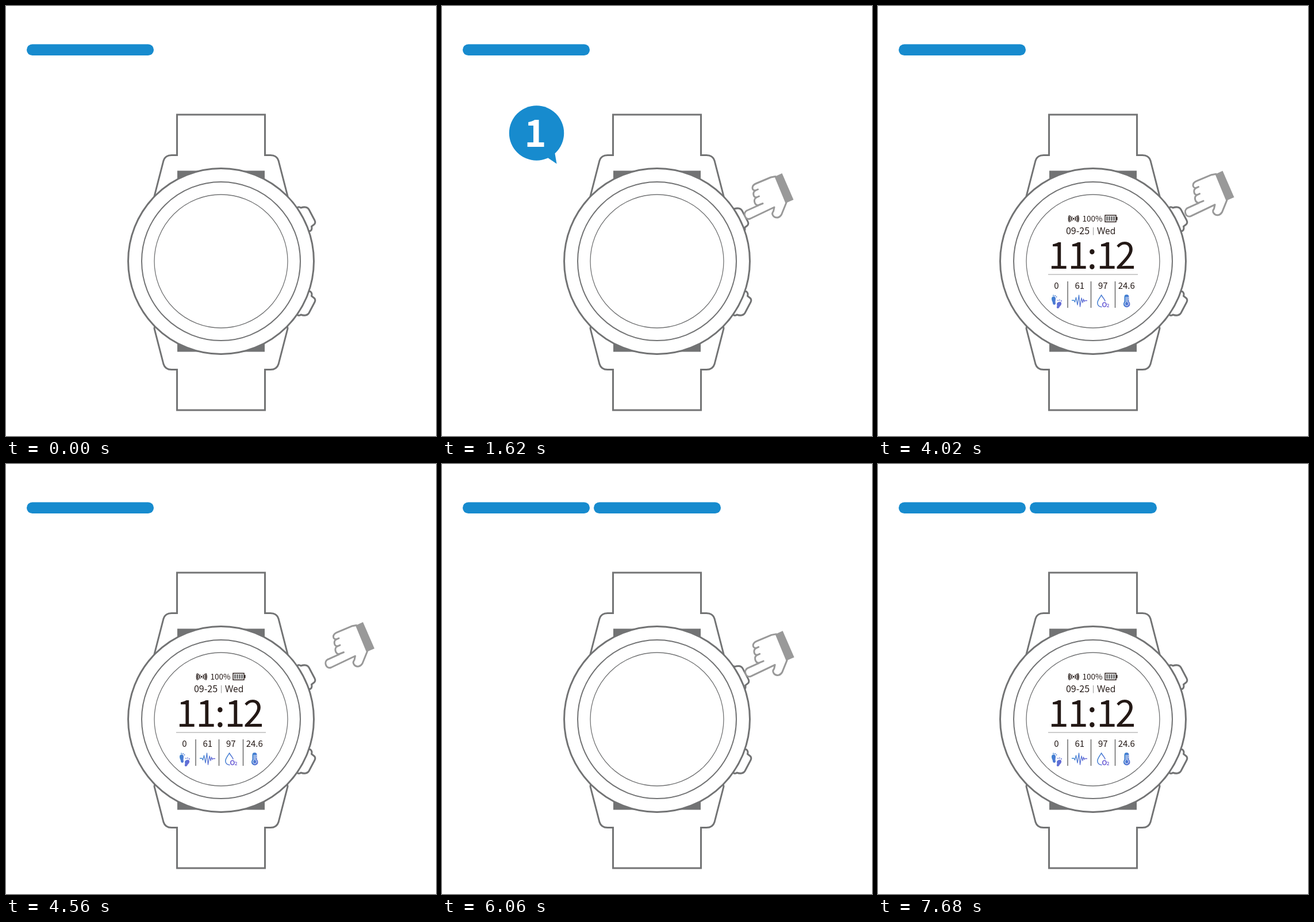
Animation, 748 px wide and 748 px high, one loop 8 s. Source, as an HTML page:

```html
<!DOCTYPE html>
<html lang="en">
<head>
<meta charset="utf-8">
<title>Smartwatch power button</title>
<style>
  html, body { margin: 0; width: 100%; height: 100%; overflow: hidden; background: #fff; }
  svg { display: block; width: 100%; height: 100%; }
  text { font-family: 'Noto Sans CJK SC', 'Noto Sans CJK JP', 'Noto Sans', sans-serif; text-anchor: middle; }
  .line { fill: #fff; stroke: #727374; stroke-width: 3; stroke-linejoin: round; }
  .ink { fill: #231815; }
  .thin { fill: none; stroke: #231815; }
</style>
</head>
<body>
<svg viewBox="0 0 748 748" xmlns="http://www.w3.org/2000/svg">
  <defs>
    <linearGradient id="tint" gradientUnits="userSpaceOnUse" x1="0" y1="0" x2="28" y2="10" spreadMethod="pad">
      <stop offset="0" stop-color="#3486d0"/>
      <stop offset="1" stop-color="#7b62d9"/>
    </linearGradient>
    <path id="key" d="M503 355 Q508 347 513 351 Q517 349.500 521 350 Q525 350.500 527 354 L537 373 Q539 377.500 536 380 L531.500 383.500 Q533 388 530 391 L524 393"/>
    <path id="lug" d="M297.500 259.500 H288 Q277 259.500 274 269 L258 331 L270 400 H374"/>
  </defs>

  <g fill="#178bce">
    <rect x="36" y="66.500" width="221" height="19.500" rx="9.750"/>
    <rect id="bar" x="264" y="66.500" width="221" height="19.500" rx="9.750"/>
  </g>

  <g class="line">
    <use href="#lug"/>
    <use href="#lug" transform="translate(748) scale(-1 1)"/>
    <use href="#lug" transform="translate(0 892) scale(1 -1)"/>
    <use href="#lug" transform="translate(748 892) scale(-1 -1)"/>
    <path d="M297.500 261 V189 H450.500 V261 M297.500 631 V703 H450.500 V631" stroke-linejoin="miter"/>
    <rect x="298" y="286.500" width="152" height="315" fill="#727374" stroke="none"/>
    <g id="press"><use href="#key"/></g>
    <use href="#key" transform="translate(0 888) scale(1 -1)"/>
    <circle cx="374" cy="444" r="161.500"/>
    <circle cx="374" cy="444" r="138" stroke-width="2"/>
    <circle cx="374" cy="444" r="116" stroke-width="1.300"/>
  </g>

  <g id="screen">
    <g class="thin" stroke-width="1.500" stroke-linecap="round">
      <circle cx="340.300" cy="370" r="1.600" class="ink" stroke="none"/>
      <path d="M337.500 367 q-2 3 0 6 M335 365.500 q-3 4.500 0 9 M332.800 364.500 q-2.800 5.500 0 11"/>
      <path d="M343.100 367 q2 3 0 6 M345.600 365.500 q3 4.500 0 9 M347.800 364.500 q2.800 5.500 0 11"/>
    </g>
    <rect class="thin" x="395" y="364" width="19" height="11.500" stroke-width="1.400"/>
    <path d="M398.500 366 V373.500 M402.500 366 V373.500 M406.500 366 V373.500 M410.500 366 V373.500" stroke="#777" stroke-width="3"/>
    <rect class="ink" x="414.500" y="367" width="2" height="5.500"/>
    <g class="ink">
      <text x="373" y="375.300" font-size="13.500">100%</text>
      <text x="347.500" y="397.300" font-size="16">09-25</text>
      <text x="397.200" y="397.300" font-size="15.500" style="font-family:'Open Sans','Noto Sans',sans-serif">Wed</text>
      <g id="clock" font-size="64"></g>
      <g font-size="15">
        <text x="310.300" y="491.500">0</text>
        <text x="350.800" y="491.500">61</text>
        <text x="391.300" y="491.500">97</text>
        <text x="432.300" y="491.500">24.6</text>
      </g>
    </g>
    <path d="M374.500 385 V398.500 M296 467 H452" stroke="#999" stroke-width="1"/>
    <path d="M330 479 V525 M370.500 479 V525 M412.500 479 V525" stroke="#555" stroke-width="1.300"/>

    <g transform="translate(301 502)" fill="url(#tint)">
      <path d="M1 7 C1 2 8 2 8 7 C8 10 7 12 8 15 C8 19 3 18 3 15 C3 12 1 11 1 7 Z"/>
      <path d="M10 16 C11 12 19 11 18 16 C18 19 15 20 14 23 C12 25 9 24 10 21 C11 19 10 18 10 16 Z"/>
      <circle cx="4" cy="1.500" r="1"/><circle cx="7" cy="2" r="1"/><circle cx="9.500" cy="4" r=".9"/>
      <circle cx="12" cy="10" r=".9"/><circle cx="15" cy="9.500" r="1"/><circle cx="18" cy="11" r="1"/>
    </g>
    <path transform="translate(337 513)" fill="none" stroke="url(#tint)" stroke-width="1.300" stroke-linejoin="round"
      d="M0 -1 H4 L5.500 2 L7.500 -6 L10 7 L12.500 -10 L14.500 10 L17 -5 L19 3 L20.500 -3 L22 1 L23 -.5 H27"/>
    <g transform="translate(381 502)">
      <path fill="none" stroke="url(#tint)" stroke-width="1.500" stroke-linecap="round"
        d="M8 21.500 C3 21.500 .8 18 .8 14.500 C.8 10 5 5.500 7.500 1 C10 5 13 8 14 11"/>
      <g fill="#7467d8" font-weight="bold">
        <text x="12.800" y="21.500" font-size="12">O</text>
        <text x="19" y="22" font-size="8">2</text>
      </g>
    </g>
    <g transform="translate(426.500 502)">
      <path fill="url(#tint)" d="M2 4 Q2 0 6 0 Q10 0 10 4 V12 Q12 14 12 16.500 A5.800 5.800 0 0 1 .4 16.500 Q.4 14 2 12 Z"/>
      <path fill="none" stroke="#fff" stroke-width="1" d="M5 4 V13 A3.300 3.300 0 1 0 7.500 13 V4 M8.500 5 h1.500 M8.500 8 h1.500"/>
    </g>
  </g>

  <g id="bubble">
    <path fill="#178bce" d="M184 264 L199.500 274.500 L196 254 Z"/>
    <circle cx="164.500" cy="221" r="47.700" fill="#178bce"/>
    <text id="count" x="162.500" y="245" font-size="65" font-weight="bold" fill="#fff"></text>
  </g>

  <g id="hand" fill="#fff" stroke="#999" stroke-width="3" stroke-linejoin="round" stroke-linecap="round">
    <path d="M580 296.500 L572 298 L547 308.500 C537 312.500 539 321 545 321 C540 324 541 333 547 333 C541 336 543 346 550 347 L530 356 C523 360 527 373 536 370 L578 350 L576.500 357 C572 362 577 369 584 368 Q588 367 590.500 363 L599 342"/>
    <path fill="none" d="M545 321 l4.500 -2 M547 333 l4.500 -2 M549 347 l9 -3.500"/>
    <path fill="#999" stroke="none" d="M578.500 297 L591.500 291 L611.500 337 L597.500 343 Z"/>
  </g>
</svg>
<script>
  const LOOP = 8000, STEP = 60;
  const $ = id => document.getElementById(id);
  const ramp = (t, a, b) => Math.min(1, Math.max(0, (t - a) / (b - a)));
  const ease = (t, a, b) => (1 - Math.cos(Math.PI * ramp(t, a, b))) / 2;
  const move = (el, x, y) => el.setAttribute('transform', `translate(${x.toFixed(2)} ${y.toFixed(2)})`);
  const fade = (el, o) => el.setAttribute('opacity', o);

  const glyphX = [314, 348, 372.5, 398, 430.5];
  $('clock').innerHTML = [...'11:12']
    .map((c, i) => `<text x="${glyphX[i]}" y="457">${c}</text>`).join('');

  function draw(t) {
    // 0 = finger on the button, 1 = hand fully back
    const away = 1 - ease(t, -180, 900) + ease(t, 3720, 4580)
                   - ease(t, 5100, 6200) + ease(t, 6900, 7980);
    const push = Math.max(0, 1 - away * 29.5 / 5.5);
    move($('hand'), 29.5 * away, -16 * away);
    move($('press'), -5 * push, 2 * push);
    fade($('hand'), ramp(t, 120, 360) - ramp(t, 7440, 7680));

    fade($('screen'), ramp(t, 3660, 4020) - ramp(t, 4680, 5100) + ramp(t, 6180, 6540));
    fade($('bar'), ramp(t, 5100, 5460));
    fade($('bubble'), t >= 1620 && t < 3720 ? 1 : 0);
    $('count').textContent = t < 2400 ? 1 : t < 3240 ? 2 : 3;
  }

  const start = performance.now();
  function tick() {
    const t = (performance.now() - start) % LOOP;
    draw(Math.floor(t / STEP) * STEP);
    requestAnimationFrame(tick);
  }
  tick();
</script>
</body>
</html>
```
